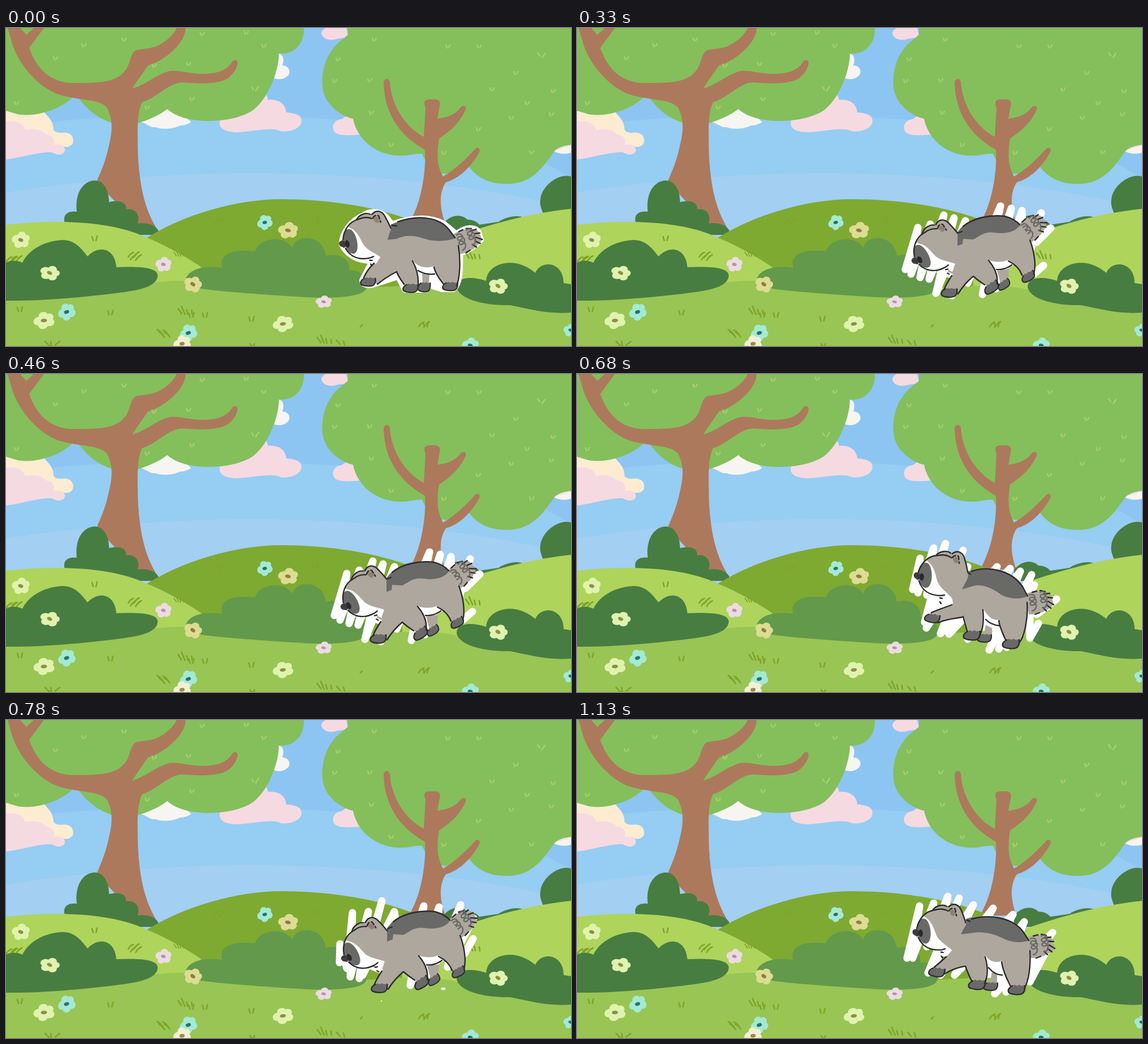
Animation of 998 by 561 pixels, one loop 1.23 s. Source, as an HTML page without scripts:

```html
<!DOCTYPE html>
<html lang="en">
<head>
<meta charset="utf-8">
<title>Meadow walk</title>
<style>
html,body{margin:0;width:100%;height:100%;overflow:hidden}
svg{display:block;width:100vw;height:100vh}
.canopy{fill:#84bf5c}.trunk{fill:#ad795c}.bush{fill:#487d41}.light{fill:#aed45c}
.pink{fill:#f6dae1}.cream{fill:#feecd2}.cloud{fill:#f6f5f1}
.tick,.blade{fill:none;stroke-linecap:round;stroke-width:2.6}
.tick{stroke:#a7d068}.blade{stroke:#80a428}
.fur{fill:#aea79d}.dark{fill:#696968}.white{fill:#fff}
.ink,.coil{fill:none;stroke:#2c2c2d;stroke-width:2.4;stroke-linecap:round;stroke-linejoin:round}
.coil{stroke:#696968}
.halo{fill:none;stroke:#fff;stroke-width:13;stroke-linecap:round;stroke-linejoin:round}
.aqua{fill:#a3ead5;color:#2f6f68}.pale{fill:#e0f3ae;color:#8f8f43}
.straw{fill:#dcdc92;color:#8f7f40}.rose{fill:#ecdce0;color:#b493ac}.ivory{fill:#f3efd2;color:#9a8b4d}
.pose{visibility:hidden;animation:1.23s step-end infinite}
.p0{animation-name:p0}.p1{animation-name:p1}.p2{animation-name:p2}
.p3{animation-name:p3}.p4{animation-name:p4}.p5{animation-name:p5}
@keyframes p0{0%{visibility:visible}12.195%{visibility:hidden}}
@keyframes p1{12.195%{visibility:visible}26.829%{visibility:hidden}}
@keyframes p2{26.829%{visibility:visible}43.902%{visibility:hidden}}
@keyframes p3{43.902%{visibility:visible}63.415%{visibility:hidden}}
@keyframes p4{63.415%{visibility:visible}80.488%{visibility:hidden}}
@keyframes p5{80.488%,99.999%{visibility:visible}}
</style>
</head>
<body>
<svg viewBox="0 0 998 561" preserveAspectRatio="none">
<defs>
  <path id="tick" d="M-3 -2L-1 3M4 -2L2 2"/>
  <path id="tuft" d="M-4 -3L-2 4M5 -4L3 4"/>
  <path id="lean" d="M-9 4Q-6 -2 0 -4M0 5Q3 -1 10 -5"/>
  <path id="fan" d="M-12 -5L-6 4M-6 -9L0 5M3 -3L5 5M12 -2L13 5"/>
  <g id="flower">
    <path d="M-5 -9C-3 -17 8 -16 9 -9C16 -10 18 -1 13 2C17 9 8 16 2 11C-4 17 -13 13 -11 5C-19 3 -16 -10 -5 -9Z"/>
    <ellipse rx="4.6" ry="3.2" transform="rotate(15)" fill="currentColor"/>
  </g>
  <g id="paw">
    <path class="dark" d="M-15 4C-15 -2 -10 -4 -4 -8L0 -6 4 -8 8 -6 14 -7C16 0 13 6 9 8C1 10 -13 11 -15 4Z"/>
    <path class="ink" d="M-8 -6C-16 -2 -17 4 -13 7C-6 10 5 10 9 8C13 6 15 0 14 -6"/>
  </g>

  <g id="head">
    <path class="white" d="M602 350C607 333 618 318 640 316L680 340 670 382 650 401 641 389C622 388 602 372 602 350Z"/>
    <path class="fur" d="M617 325C624 319 632 317 636 316C642 309 655 309 661 313C672 307 682 311 685 324L690 345 670 382 664 398C664 388 645 380 637 364C633 352 632 338 622 330Z"/>
    <path class="dark" d="M605 338C608 330 617 327 622 333C628 343 628 358 624 368C620 376 614 376 609 370C603 362 602 348 605 338Z"/>
    <path class="ink" d="M603 346C608 331 620 317 638 317C648 315 655 317 661 321M604 362C609 378 622 388 643 388L649 387M635 316C642 309 654 308 660 313M663 314C672 307 682 311 685 324Q688 334 690 345M641 392L645 393M641 399L643 402"/>
    <ellipse cx="669" cy="325" rx="4.5" ry="6" fill="#8e8272" transform="rotate(-20 669 325)"/>
    <path class="ink" stroke-dasharray="7 4" d="M663 321Q667 315 674 319L675 331"/>
    <path fill="#3c3c3d" d="M595 350C598 345 606 346 606 352C607 359 602 363 599 358C596 357 594 354 595 350Z"/>
    <ellipse cx="609" cy="355" rx="3.8" ry="6.5" fill="#29292a"/>
  </g>

  <g id="tail">
    <path class="fur" d="M794 384C812 378 830 379 838 388L842 404C832 414 818 422 798 421Z"/>
    <path class="ink" d="M804 382L812 380M818 379L827 381M824 385L835 384M830 391L840 392M832 398L842 404M829 404L837 410M823 409L829 415M817 418L809 421"/>
    <path id="curl" class="coil" d="M799 387c10-5 14 8 5 10c-8 0-5-8 2-6c9 5 5 14-3 14c-6-2-1-8 4-5c8 5 3 14-3 15"/>
    <use href="#curl" x="19" y="-5"/>
  </g>

  <g id="stride">
    <use href="#tail"/>
    <path class="white" d="M640 388H672L662 406 645 407ZM716 410L750 426 748 450H716Z"/>
    <path class="fur" d="M722 440L718 458 733 460 733 445Z"/>
    <use href="#paw" transform="translate(720 462) scale(.85)"/>
    <path class="fur" d="M662 385L690 345C720 334 760 340 780 362C790 374 796 390 797 405C798 430 790 455 782 470L757 468C752 455 746 440 745 430C735 433 726 425 718 412C718 430 717 445 712 455L690 452C686 440 684 432 682 425C665 430 650 430 636 436L624 420C640 412 655 408 664 402Z"/>
    <path class="dark" d="M690 346C720 335 765 338 787 370L796 389C782 395 765 394 750 387C738 378 718 366 700 371L680 377C686 364 693 358 690 346Z"/>
    <use href="#paw" transform="translate(698 457)"/>
    <use href="#paw" transform="translate(767 472)"/>
    <use href="#paw" transform="translate(628 427) rotate(8) scale(.9)"/>
    <path class="ink" d="M690 347L695 350M697 345C730 334 768 345 787 372L796 389M795 400C797 430 790 460 782 470M757 466C752 455 746 440 745 432M717 413C719 432 717 447 712 457M689 450C686 440 684 432 682 425M680 426C662 429 650 430 637 436M662 404C648 410 638 412 626 418M722 430C729 438 737 440 746 441"/>
  </g>

  <g id="step">
    <use href="#tail" transform="translate(2 -1)"/>
    <path class="white" d="M636 404H670L655 420 646 416ZM720 412L755 423 755 455H722Z"/>
    <path class="fur" d="M733 445L729 466 742 468 742 448Z"/>
    <use href="#paw" transform="translate(731 469) scale(.85)"/>
    <path class="fur" d="M655 404L688 350C715 343 760 345 780 365C795 380 802 400 801 420C801 445 796 462 790 474L766 472C758 455 752 440 750 425C738 430 728 425 721 415C726 435 726 452 720 465L697 460C692 450 688 440 686 432C675 436 662 440 648 449L630 437C640 428 645 420 655 414Z"/>
    <path class="dark" d="M688 351C715 343 760 343 783 366L798 389C785 394 768 393 752 385C735 376 712 372 697 376L678 378C683 366 690 362 688 351Z"/>
    <use href="#paw" transform="translate(707 466)"/>
    <use href="#paw" transform="translate(777 475)"/>
    <use href="#paw" transform="translate(636 444) rotate(6) scale(.95)"/>
    <path class="ink" d="M688 353L694 355M697 351C730 342 768 349 787 372L798 389M800 407C802 438 797 462 790 474M766 470C758 455 752 440 750 427M721 418C726 435 726 452 720 465M697 460C692 450 688 440 686 434Q665 438 649 448M653 417Q641 428 631 436M727 437Q738 450 751 450"/>
  </g>

  <g id="stand">
    <use href="#tail" transform="translate(-1 -26) rotate(-12 819 400)"/>
    <path class="white" d="M632 408H668L652 420ZM716 408L758 418 766 440H725Z"/>
    <path class="fur" d="M735 433L736 455 747 450 748 434Z"/>
    <use href="#paw" transform="translate(739 456) scale(.75 1)"/>
    <path class="fur" d="M650 405L680 347C710 333 755 330 778 350C795 365 803 390 802 415C801 435 799 448 795 456L774 452C766 445 758 432 756 420C742 425 728 422 718 410C726 425 729 440 728 455L704 454C698 445 692 436 690 429C680 435 668 442 656 452L632 440C636 428 645 418 652 412Z"/>
    <path class="dark" d="M680 347C710 332 755 330 778 350L793 371C778 377 755 377 740 372C720 365 705 365 690 372L672 374C676 362 682 358 680 347Z"/>
    <use href="#paw" transform="translate(715 458) scale(.9)"/>
    <use href="#paw" transform="translate(785 455) scale(.9)"/>
    <use href="#paw" transform="translate(640 447) scale(.9)"/>
    <path class="ink" d="M681 348L690 349M692 342C725 330 763 332 782 355L793 370M799 384C804 415 801 442 796 455M773 452C765 442 758 432 756 422M718 411C726 425 729 440 728 455M703 452C698 445 692 436 690 430Q672 439 656 452M651 414Q639 425 632 440M728 428Q742 436 757 434"/>
  </g>

  <g id="lunge">
    <use href="#tail" transform="translate(-11 -49) rotate(-28 819 400)"/>
    <path class="white" d="M632 430H672L660 442ZM700 437L712 410 768 406 772 418 748 432 715 448Z"/>
    <path class="fur" d="M742 428L748 450 762 444 763 425Z"/>
    <use href="#paw" transform="translate(754 452) rotate(-35) scale(.8)"/>
    <path class="fur" d="M655 430L668 375C685 345 710 332 735 331C765 331 785 345 797 365C806 385 810 405 807 425L806 435 787 438C783 425 772 415 762 409Q745 416 726 409C738 422 744 435 743 450L724 455 700 438C692 446 682 456 674 468L648 464C654 452 660 445 664 434Z"/>
    <path class="dark" d="M672 360C690 336 715 331 735 331C760 331 775 338 782 348C775 360 755 364 738 361C720 358 712 367 700 373L682 372 681 381 668 386C671 376 669 368 672 360Z"/>
    <use href="#paw" transform="translate(658 466) scale(.95)"/>
    <use href="#paw" transform="translate(732 457) rotate(-35) scale(.95)"/>
    <use href="#paw" transform="translate(797 438) rotate(-30) scale(.85)"/>
    <path class="ink" d="M672 362L680 359M682 350C700 335 730 329 755 332Q772 336 782 347M800 374C808 395 811 418 807 434M786 436C782 425 772 416 762 411M727 410C739 424 744 438 742 452M720 453Q709 446 700 438C690 446 680 458 673 469M662 437Q654 448 648 462M741 426Q756 427 768 418"/>
  </g>
</defs>

<rect width="998" height="561" fill="#8dc5f2"/>
<path fill="#95cdf3" d="M0 175C180 150 380 148 560 160C760 175 900 200 998 265V561H0Z"/>
<path fill="#a2cff2" d="M0 290C150 266 320 254 460 256C640 258 800 275 945 305L998 320V561H0Z"/>

<path class="cream" d="M0 145H66C70 155 84 160 84 180C92 188 98 183 108 185C118 187 121 198 117 205C110 212 103 210 95 207H0Z"/>
<path class="pink" d="M0 165C15 163 30 166 34 180C50 176 65 180 70 188C82 188 88 197 84 206C96 204 105 208 104 216C102 225 90 225 80 219C60 218 30 228 0 232Z"/>
<path class="cloud" d="M238 166C250 169 254 176 264 175C280 181 300 176 308 172Q318 172 327 166L300 140H285Z"/>
<path class="pink" d="M378 163C374 178 388 184 410 184C440 182 470 174 485 182C500 184 522 178 522 164C522 152 508 150 495 149C494 130 475 125 463 127C462 118 455 112 440 112Z"/>
<path class="cloud" d="M480 45C492 45 491 60 488 66C500 66 504 78 498 84C490 92 478 92 468 86Z"/>
<path class="pink" d="M557 8C560 0 570 -2 575 -5H600L604 14C600 19 590 17 582 20C570 23 557 18 557 8ZM615 154C600 150 598 160 592 161C578 162 573 178 582 185C592 192 615 188 635 188Z"/>
<path class="cloud" d="M965 216C978 224 990 222 998 220V203Z"/>
<path class="pink" d="M965 216Q980 214 998 207V200Z"/>

<path class="canopy" d="M0 0H526C528 20 515 48 482 45C482 75 465 120 440 142C410 168 318 174 285 143C270 154 260 158 245 164C225 172 205 171 190 168C160 160 140 140 127 122H118C95 145 50 158 20 152L0 146ZM604 0V12C595 20 582 28 575 40C560 60 556 90 560 110C565 135 590 155 613 160C620 195 650 222 690 225C710 227 722 220 735 222C745 245 758 258 775 257C790 260 805 256 818 245C835 268 860 276 888 275C925 274 945 252 968 218C975 210 985 208 998 206V0Z"/>
<path class="trunk" d="M3 0L10 25C20 60 55 105 95 118C130 128 165 125 178 140C192 165 186 190 180 215C173 245 163 262 160 272L235 350H264C243 315 235 270 233 220C232 170 232 150 240 131C268 122 286 98 310 96C340 98 370 100 390 90C402 82 410 68 409 60C407 54 400 56 398 62C388 75 375 80 350 81C325 82 300 72 285 77C265 83 250 98 223 107C232 92 243 78 251 66C275 60 312 32 317 5V0H301C300 5 290 20 270 30C255 38 240 36 228 40C217 50 220 68 207 79C190 98 155 97 115 97C80 95 55 75 41 35L67 0H49L36 12 25 0Z"/>
<path class="trunk" d="M717 335C735 300 742 250 740 215C705 195 668 160 667 95C670 88 676 88 678 95C680 135 705 175 738 192L741 140C736 130 740 125 752 126C766 125 768 130 766 138L762 160C780 158 795 152 803 140C810 134 815 140 811 146C800 170 780 185 765 195C760 225 762 245 772 262C790 252 812 232 828 214C833 208 839 213 836 219C822 245 800 266 777 272C765 290 765 315 776 345H712Z"/>
<g class="tick">
  <use href="#tick" x="137" y="30"/><use href="#tick" x="208" y="20"/><use href="#tick" x="87" y="53"/>
  <use href="#tick" x="346" y="10"/><use href="#tick" x="424" y="8"/><use href="#tick" x="455" y="31"/>
  <use href="#tick" x="261" y="66"/><use href="#tick" x="322" y="63"/><use href="#tick" x="18" y="132"/>
  <use href="#tick" x="328" y="125"/><use href="#tick" x="249" y="140"/>
  <path d="M434 104L437 109M446 103L441 111M939 44L943 49M952 45L947 52"/>
  <use href="#tick" x="650" y="20"/><use href="#tick" x="780" y="32"/><use href="#tick" x="835" y="32"/>
  <use href="#tick" x="586" y="55"/><use href="#tick" x="580" y="93"/><use href="#tick" x="642" y="92"/>
  <use href="#tick" x="900" y="79"/><use href="#tick" x="858" y="108"/><use href="#tick" x="920" y="132"/>
  <use href="#tick" x="966" y="111"/><use href="#tick" x="892" y="158"/><use href="#tick" x="963" y="152"/>
  <use href="#tick" x="834" y="178"/><use href="#tick" x="645" y="149"/><use href="#tick" x="680" y="206"/>
  <use href="#tick" x="773" y="220"/><use href="#tick" x="928" y="219"/>
</g>

<path class="bush" d="M105 348C98 330 108 322 125 324C122 300 130 272 155 269C175 268 182 290 182 307C195 304 214 304 212 320C230 317 238 332 232 345C250 342 270 348 271 365H220ZM998 262C975 255 946 280 944 302C942 312 946 320 950 330H998ZM772 346C785 328 805 328 815 338C825 338 832 342 836 347L870 342C880 334 905 328 915 335V365H772Z"/>
<path fill="#7eaa31" d="M240 376C300 335 400 301 490 302C600 303 690 325 740 350V480H240Z"/>
<path class="light" d="M0 347C80 338 170 340 230 362C275 380 310 398 345 422V490H0ZM700 402C790 368 890 330 998 319V510H700Z"/>
<g class="blade">
  <g opacity=".65"><use href="#lean" x="377" y="341"/><use href="#tuft" x="545" y="339"/></g>
  <use href="#tuft" x="156" y="371"/><use href="#lean" x="225" y="400"/><use href="#lean" x="229" y="405"/>
  <use href="#fan" transform="translate(305 399) scale(.7)"/><use href="#lean" x="10" y="408"/><use href="#lean" x="18" y="407"/>
  <use href="#fan" x="824" y="402"/>
</g>
<path fill="#98c554" d="M0 481C110 478 210 450 300 446C420 445 500 460 640 458C700 455 760 450 810 465C880 490 950 505 998 500V561H0Z"/>
<path fill="#63994b" d="M318 441C325 425 350 418 382 423C376 405 390 388 440 394C445 372 490 362 506 388C510 363 560 362 565 402C590 395 610 410 606 428C630 425 640 445 636 460C630 475 580 477 530 475C450 470 380 465 345 460Z"/>
<path class="bush" d="M0 414C10 409 20 410 29 414C38 395 62 376 100 374C122 374 134 390 144 403C162 383 192 386 195 422C225 421 266 420 268 436C268 455 240 462 200 467C140 475 60 482 0 481ZM796 457C796 440 820 437 848 446C850 420 880 410 905 416C920 420 930 428 935 432C945 408 985 412 985 450L998 452V502C960 505 930 497 890 489C850 490 800 480 796 457Z"/>

<g class="blade">
  <use href="#tuft" x="24" y="496"/><use href="#tuft" x="184" y="502"/><use href="#fan" x="316" y="500"/>
  <use href="#tuft" x="327" y="506"/><use href="#tuft" x="351" y="506"/><use href="#lean" transform="translate(277 537) scale(-1 1)"/>
  <use href="#lean" transform="translate(280 541) scale(-1 1)"/><use href="#tuft" x="433" y="513"/>
  <use href="#fan" x="562" y="551"/><use href="#lean" x="738" y="523"/><use href="#tuft" x="741" y="523"/>
  <path d="M626 527L629 524M584 551L590 558M596 552L598 559M431 557L434 561M439 557L437 561M69 553L77 561M79 553L80 560M95 553L87 559"/>
</g>
<use href="#flower" class="pale" x="26" y="374"/>
<use href="#flower" class="pale" transform="translate(77 432) scale(1.1 .9) rotate(20)"/>
<use href="#flower" class="rose" transform="translate(278 417) scale(.9)"/>
<use href="#flower" class="straw" transform="translate(330 452) rotate(20)"/>
<use href="#flower" class="aqua" transform="translate(457 343) scale(.88) rotate(-30)"/>
<use href="#flower" class="straw" transform="translate(498 357) scale(1.12 1)"/>
<use href="#flower" class="aqua" transform="translate(107 501) rotate(-30)"/>
<use href="#flower" class="pale" transform="translate(67 516) scale(1.2 1) rotate(-20)"/>
<use href="#flower" class="aqua" transform="translate(322 538) rotate(-30)"/>
<use href="#flower" class="ivory" transform="translate(311 557) rotate(-20)"/>
<use href="#flower" class="pale" transform="translate(489 522) scale(1.18 .95) rotate(-25)"/>
<use href="#flower" class="rose" transform="translate(561 483) scale(.9 .75)"/>
<use href="#flower" class="pale" transform="translate(869 455) scale(1.06 .95) rotate(20)"/>
<use href="#flower" class="aqua" transform="translate(997 533) scale(.8)"/>
<use href="#flower" class="aqua" transform="translate(820 560) scale(.95)"/>

<g class="pose p0">
  <g class="halo" stroke-width="10">
    <path id="rim" fill="#fff" style="stroke-width:8" d="M592 382C592 360 610 338 630 330C640 322 660 320 672 332L682 345C715 332 750 331 775 345L796 362C810 350 830 348 836 360L840 374C830 385 815 395 803 398C804 430 802 455 790 462H770L748 455 742 463H704L692 440 655 452C640 457 628 455 628 445L645 412C620 412 600 400 592 382Z"/>
  </g>
  <use href="#stand"/>
  <use href="#head" transform="translate(-6 28) rotate(-13 600 354)"/>
</g>
<g class="pose p1">
  <path class="halo" d="M598 370L614 320 604 380 632 312 617 385 660 309 612 438 694 310 630 435 716 324 643 450 740 334 662 465 757 344 674 467 776 348 692 469 788 357 725 472 798 368 742 474 802 380 775 475 797 440 795 468 802 455"/>
  <use href="#stride"/>
  <use href="#head"/>
</g>
<g class="pose p2">
  <path class="halo" d="M580 426L602 352 590 434 624 346 606 440 648 330 622 443 666 335 634 468 686 340 662 472 710 350 690 450 748 314 716 470 767 318 740 460 786 322 790 430 820 326 800 370 837 353 812 378M824 419L808 433"/>
  <use href="#lunge"/>
  <use href="#head" transform="translate(-3 58) rotate(-28 600 354)"/>
</g>
<g class="pose p3">
  <path class="halo" d="M593 380L606 325 602 386 630 307 618 390 651 299 614 438 682 311 617 448 690 340 642 458 742 340 657 459 765 343 690 468 783 348 728 487 803 354 745 485 808 372 759 482 800 420 800 466 815 440M812 424L847 397"/>
  <use href="#stride" y="3"/>
  <use href="#head" y="3"/>
</g>
<g class="pose p4">
  <path class="halo" d="M589 428L590 395 602 438 612 340 608 453 640 338 624 456 664 319 630 450 686 338 700 440 738 328 714 468 765 330 750 450 803 326 780 436 826 350 800 375M825 386L810 412"/>
  <path class="white" d="M769 474a4 1.5 0 1 0 7 0a4 1.5 0 1 0-7 0ZM662 495h2v2h-2Z"/>
  <use href="#lunge" x="2" y="6"/>
  <use href="#head" transform="translate(-2 68) rotate(-28 600 354)"/>
</g>
<g class="pose p5">
  <path class="halo" d="M583 420L605 328 593 420 630 323 618 400 655 311 640 400 675 314 620 446 700 326 642 450 735 332 667 450 770 343 700 470 790 356 738 483 840 375 758 480 836 394 800 462 810 432"/>
  <use href="#step"/>
  <use href="#head" transform="translate(-2 22) rotate(-6 600 354)"/>
</g>
</svg>
</body>
</html>
```
